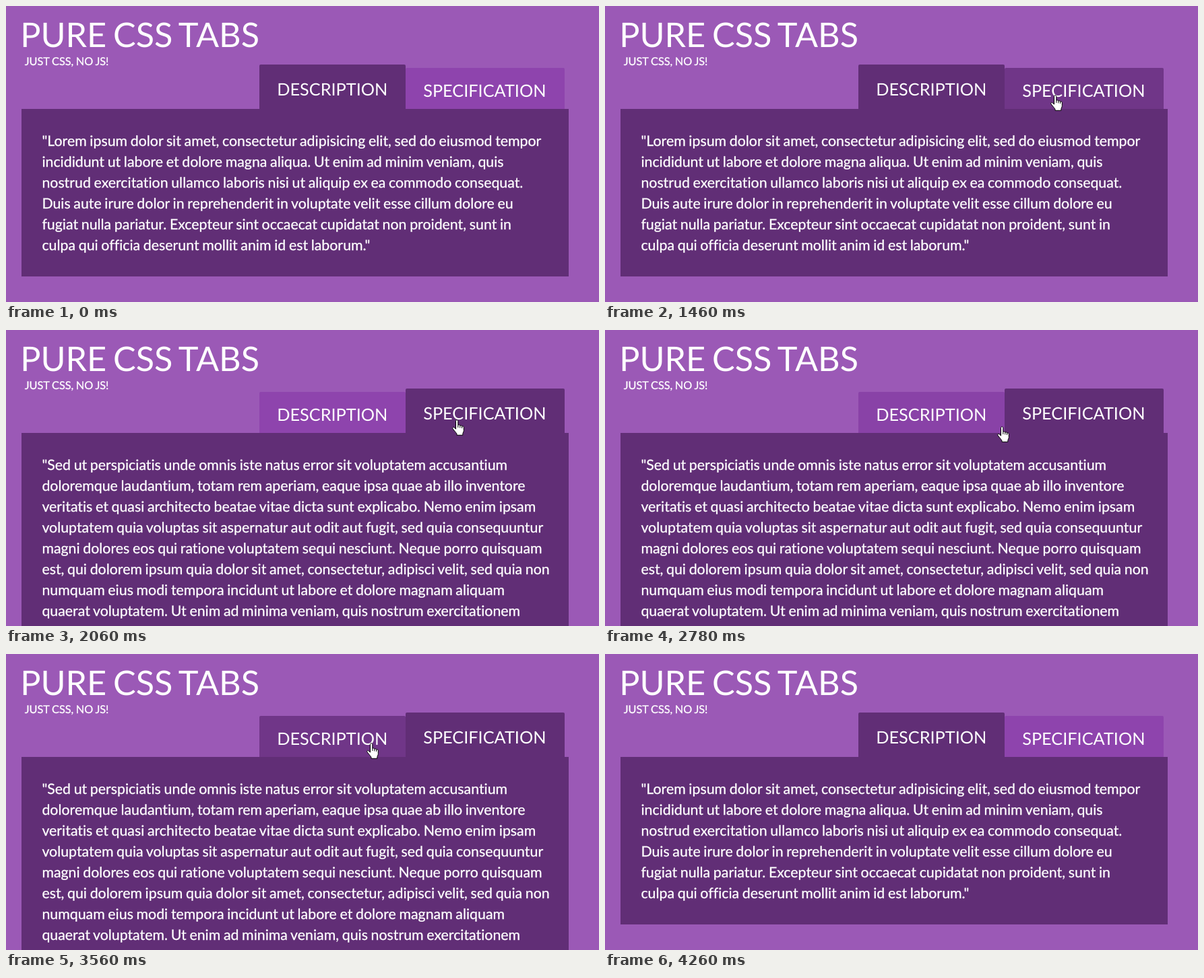
These frames come from a looping animation (880 by 440 pixels, 5130 ms). An HTML page:

```html
<!DOCTYPE html>
<html lang="en">
<head>
<meta charset="utf-8">
<title>Pure CSS Tabs</title>
<style>
  html, body { margin: 0; width: 100%; height: 100%; overflow: hidden; background: #9b59b6; }
  svg { display: block; }
  text {
    font-family: Lato, sans-serif; fill: #fff; white-space: pre;
    text-rendering: geometricPrecision; font-variant-ligatures: none; word-spacing: -0.0375em;
  }
  .title { font-size: 50.4px; word-spacing: -0.06em; }
  .sub { font-size: 16.3px; }
  .body text { font-size: 21.33px; }
  .sub, .body text { stroke: #fff; stroke-width: 0.3px; }
  .tab text { font-size: 25.3px; }
</style>
</head>
<body>
<svg width="880" height="440" viewBox="0 0 880 440">
  <rect width="880" height="440" fill="#9b59b6"/>
  <text class="title" x="21.2" y="61">PURE CSS TABS</text>
  <text class="sub" x="27.7" y="88">JUST CSS, NO JS!</text>
  <g id="tabs"></g>
  <rect id="panel" x="23" y="153" width="812" height="249" fill="#612e76"/>
  <g id="pages"></g>
  <g id="cursor">
    <g id="hand" fill="#fff" stroke="#000" stroke-linejoin="round">
      <path d="M5.5 2.5C5.5 .2 8.8 .2 8.8 2.5V8.5C9.6 7.6 11.8 7.9 11.8 9.4C12.6 8.6 14.6 9 14.6 10.3C15.5 9.6 17.3 10 17.3 11.8V16.5C17.3 18.5 15.8 19.8 15.8 21.5V23.3H7V21.5C5.5 19 3.5 17 1.2 14C-.2 12 2 10.8 3.5 12.2L5.5 14.2Z"/>
      <path d="M8.8 8.5V12M11.8 9.4V12.5M14.6 10.3V13" fill="none"/>
    </g>
    <path id="beam" d="M3.5 3.5H6.5L7.5 4.5L8.5 3.5H11.5M7.5 4.5V19.5M3.5 20.5H6.5L7.5 19.5L8.5 20.5H11.5" fill="none" stroke="#fff"/>
  </g>
</svg>
<script>
const LOOP = 5130, FADE = 180, OPEN_SPEC = 1890, OPEN_DESC = 3830;
const BASE = [142, 68, 173], HOVER = [112, 54, 136], ACTIVE = [97, 46, 118];

const pageText = [
  [
    '"Lorem ipsum dolor sit amet, consectetur adipisicing elit, sed do eiusmod tempor',
    'incididunt ut labore et dolore magna aliqua. Ut enim ad minim veniam, quis',
    'nostrud exercitation ullamco laboris nisi ut aliquip ex ea commodo consequat.',
    'Duis aute irure dolor in reprehenderit in voluptate velit esse cillum dolore eu',
    'fugiat nulla pariatur. Excepteur sint occaecat cupidatat non proident, sunt in',
    'culpa qui officia deserunt mollit anim id est laborum."'
  ],
  [
    '"Sed ut perspiciatis unde omnis iste natus error sit voluptatem accusantium',
    'doloremque laudantium, totam rem aperiam, eaque ipsa quae ab illo inventore',
    'veritatis et quasi architecto beatae vitae dicta sunt explicabo. Nemo enim ipsam',
    'voluptatem quia voluptas sit aspernatur aut odit aut fugit, sed quia consequuntur',
    'magni dolores eos qui ratione voluptatem sequi nesciunt. Neque porro quisquam',
    'est, qui dolorem ipsum quia dolor sit amet, consectetur, adipisci velit, sed quia non',
    'numquam eius modi tempora incidunt ut labore et dolore magnam aliquam',
    'quaerat voluptatem. Ut enim ad minima veniam, quis nostrum exercitationem'
  ]
];

// Each state: start time, then red, green, blue and lift in px.
const tabData = [
  { label: 'DESCRIPTION', x: 376, width: 217, states: [
    [0, ...ACTIVE, 5], [OPEN_SPEC, ...BASE, 0], [2735, ...HOVER, 0], [OPEN_DESC, ...ACTIVE, 5]] },
  { label: 'SPECIFICATION', x: 593, width: 236, states: [
    [0, ...BASE, 0], [700, ...HOVER, 0], [OPEN_SPEC, ...ACTIVE, 5], [OPEN_DESC, ...BASE, 0]] }
];

// Cursor stops: time, left, top.
const path = [
  [430, 521, 388], [560, 590, 240], [690, 640, 152], [910, 650, 148], [970, 651, 149],
  [1210, 661, 132], [1460, 661, 132], [1470, 662, 133], [2550, 662, 133], [2780, 582, 143],
  [3060, 564, 136], [3560, 535, 132], [4060, 535, 132], [4250, 500, 400]
];

const byId = id => document.getElementById(id);
function add(parent, name, attrs = {}, content = '') {
  const node = document.createElementNS('http://www.w3.org/2000/svg', name);
  for (const key in attrs) node.setAttribute(key, attrs[key]);
  node.textContent = content;
  return parent.appendChild(node);
}

const tabs = tabData.map(tab => {
  const group = add(byId('tabs'), 'g', { class: 'tab' });
  return {
    ...tab,
    shape: add(group, 'path'),
    text: add(group, 'text', { x: tab.x + 26.2 }, tab.label)
  };
});
const pages = pageText.map(lines => {
  const group = add(byId('pages'), 'g', { class: 'body' });
  lines.forEach((line, i) => add(group, 'text', { x: 53.4, y: 208 + 31 * i }, line));
  return group;
});

const mix = (a, b, p) => a + (b - a) * p;
const show = (node, on) => node.setAttribute('visibility', on ? 'visible' : 'hidden');

function stateAt(states, t) {
  const i = states.findLastIndex(s => s[0] <= t);
  const now = states[i], before = states[Math.max(0, i - 1)];
  const p = Math.min(1, (t - now[0]) / FADE);
  const eased = p * p * (3 - 2 * p);
  return now.slice(1).map((v, k) => mix(before[k + 1], v, eased));
}

function drawTab(tab, t) {
  const [r, g, b, lift] = stateAt(tab.states, t);
  const top = 92 - lift, right = tab.x + tab.width;
  tab.shape.setAttribute('d',
    `M${tab.x} 153V${top + 2}q0-2 2-2H${right - 2}q2 0 2 2V153Z`);
  tab.shape.setAttribute('fill', `rgb(${r},${g},${b})`);
  tab.text.setAttribute('y', 135 - lift * 0.4);
}

function drawCursor(t) {
  const i = path.findIndex(stop => stop[0] > t);
  show(byId('cursor'), i > 0);
  if (i < 1) return;
  const [t0, x0, y0] = path[i - 1], [t1, x1, y1] = path[i];
  const p = (t - t0) / (t1 - t0);
  const x = Math.round(mix(x0, x1, p)), y = Math.round(mix(y0, y1, p));
  byId('cursor').setAttribute('transform', `translate(${x} ${y})`);
  byId('hand').style.display = y < 153 ? '' : 'none';
  byId('beam').style.display = y < 153 ? 'none' : '';
}

function draw(t) {
  const spec = t >= OPEN_SPEC && t < OPEN_DESC;
  byId('panel').setAttribute('height', spec ? 287 : 249);
  show(pages[0], !spec);
  show(pages[1], spec);
  tabs.forEach(tab => drawTab(tab, t));
  drawCursor(t);
}

const start = performance.now();
function tick() {
  draw((performance.now() - start) % LOOP);
  requestAnimationFrame(tick);
}
tick();
</script>
</body>
</html>
```
